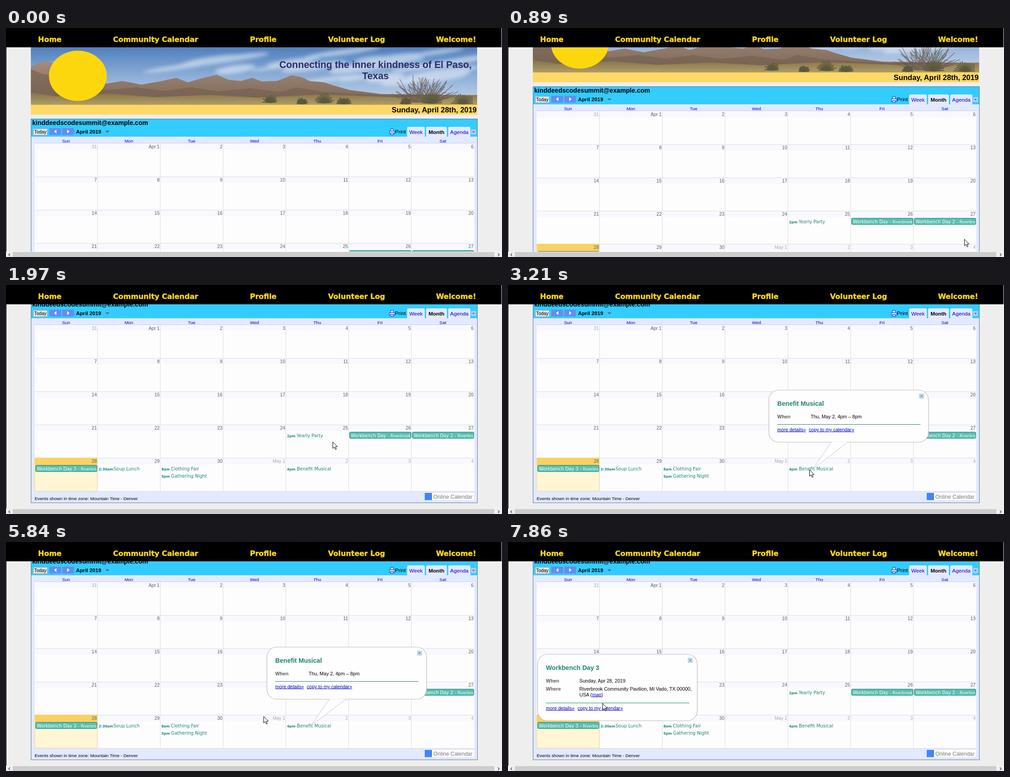
These frames come from a looping animation (1098 px wide and 510 px high, 8000 ms). An HTML page:

```html
<!DOCTYPE html>
<html lang="en">
<head>
<meta charset="utf-8">
<title>Community Calendar</title>
<style>
html, body { margin: 0; width: 100%; height: 100%; overflow: hidden; background: #eee; }
svg { display: block; }
text { white-space: pre; }
.s { font-family: "Liberation Sans", Arial, sans-serif; }
.v { font-family: "DejaVu Sans", Verdana, sans-serif; }
.o { font-family: "Open Sans", "Noto Sans", sans-serif; }
.b { font-weight: bold; }
.m { text-anchor: middle; }
.e { text-anchor: end; }
.u { text-decoration: underline; }
</style>
</head>
<body>
<svg id="stage" width="1098" height="510" viewBox="0 0 1098 510"></svg>
<script>
const LOOP = 8000, TEAL = '#1f8273', LINK = '#0000cc';
const text = (x, y, str, size, fill, cls = 's') =>
  `<text x="${x}" y="${y}" font-size="${size}" fill="${fill}" class="${cls}">${str}</text>`;
const rect = (x, y, w, h, fill, more = '') =>
  `<rect x="${x}" y="${y}" width="${w}" height="${h}" fill="${fill}" ${more}/>`;
const path = (d, fill, more = '') => `<path d="${d}" fill="${fill}" ${more}/>`;

let seed = 7;
const rnd = () => (seed = (seed * 16807) % 2147483647) / 2147483647;

// ---- banner ----
function tuft(x, y, r, color) {
  let d = '';
  for (let a = -1.5; a <= 1.5; a += 0.2) {
    const l = r * (0.75 + rnd() * 0.35);
    d += `M${x} ${y}L${(x + Math.sin(a) * l).toFixed(1)} ${(y - Math.cos(a) * l).toFixed(1)}`;
  }
  return path(d, 'none', `stroke="${color}" stroke-width="2"`);
}

function shrub() {
  let d = '';
  for (let i = 0; i < 110; i++) {
    const a = (rnd() - 0.5) * 2.6, l = 30 + rnd() * 32, x = 925 + (rnd() - 0.5) * 50;
    d += `M${x.toFixed(1)} 166L${(x + Math.sin(a) * l).toFixed(1)} ${(166 - Math.cos(a) * l).toFixed(1)}`;
  }
  return path(d, 'none', 'stroke="#65564c" stroke-width="1.3" opacity=".75"');
}

function banner() {
  let clouds = '';
  for (let i = 0; i < 26; i++) {
    const x = 55 + rnd() * 988, y = 50 + rnd() * 70;
    clouds += `<ellipse cx="${x.toFixed(0)}" cy="${y.toFixed(0)}" rx="${(35 + rnd() * 75).toFixed(0)}" ry="${(3 + rnd() * 7).toFixed(0)}" transform="rotate(-8 ${x.toFixed(0)} ${y.toFixed(0)})"/>`;
  }
  const ridge = 'M55 86L72 78 95 74 130 92 175 112 222 124 258 118 300 126 345 118 377 111 402 121 430 113 466 104 492 115 520 118 545 111 566 119 600 118 633 105 656 110 672 118 705 121 722 127 760 138 830 147 1043 150V171H55Z';
  const shade = 'M55 92L85 104 120 100 160 128 225 138 290 132 350 140 410 132 470 141 540 134 610 143 640 132 700 142 780 147 900 152V171H55Z';
  const ground = 'M55 144L110 152 230 146 330 154 450 149 560 155 700 148 860 154 1043 149V171H55Z';
  const tufts = [[585, 166, 17], [705, 167, 21], [748, 169, 16], [942, 168, 25], [1012, 169, 25], [885, 169, 15], [655, 169, 13]];
  return `<svg x="55" y="43" width="988" height="128" viewBox="55 43 988 128">` +
    rect(55, 43, 988, 128, 'url(#sky)') +
    `<g fill="#edf2f8" opacity=".58" filter="url(#soft)">${clouds}</g>` +
    path(ridge, 'url(#rock)') + path(shade, '#735f50', 'opacity=".6"') + path(ground, 'url(#sand)') +
    shrub() + tufts.map(([x, y, r]) => tuft(x, y, r, '#5b593b')).join('') + '</svg>' +
    '<ellipse cx="159" cy="106.5" rx="64" ry="56" fill="#fdd70d"/>' +
    text(818, 89, 'Connecting the inner kindness of El Paso,', 21.3, '#2c2c66', 's b m') +
    text(818, 114, 'Texas', 21.3, '#2c2c66', 's b m') +
    rect(55, 171, 988, 22, '#ffd966') +
    text(1042, 188, 'Sunday, April 28th, 2019', 16.45, '#000', 's b e');
}

// ---- calendar ----
const colX = c => c ? 63.5 + 139 * c : 63.5;
const rowY = r => 257 + 74 * r;

function timed(c, r, line, time, name, gap) {
  const x = colX(c) + 2.5, y = rowY(r) + 28 + 15.5 * line;
  return text(x, y, time, 7.7, TEAL, 'v b') + text(x + gap, y, name, 9.95, TEAL, 'v');
}

function allDay(c, r, name) {
  const x = colX(c) + 1.5, y = rowY(r) + 16;
  return rect(x + .5, y + .5, 136, 14, '#58bfb1', `stroke="${TEAL}" rx="2"`) +
    `<svg x="${x}" y="${y}" width="136" height="15"><text x="3.5" y="12" font-size="9.9" fill="#fff" class="v">${name} - <tspan font-size="8.2">Riverbrook Community</tspan></text></svg>`;
}

function calendar() {
  let s = rect(55.5, 202.5, 988, 450.5, '#e3e9ff', 'stroke="#56788c"') +
    rect(56, 203, 987, 39, '#33ccff') +
    text(58, 216, 'kinddeedscodesummit@example.com', 14.13, '#000', 's b') +
    rect(60.5, 224.5, 31, 14, '#e4e4e4', 'stroke="#a9a9a9"') + text(76, 235, 'Today', 10.3, '#000', 's m') +
    rect(96, 223, 26, 15, '#668cee') + rect(124.5, 223, 26, 15, '#668cee') +
    path('M111.5 226v9l-5-4.5zM135.5 226v9l5-4.5z', '#fff') +
    text(155, 235, 'April 2019', 11.7, '#000', 's b') + path('M220 229h9l-4.5 4.5z', '#666') +
    path('M851.5 229v-4.5h6v4.5M851 235.5h-2v-6h11v6h-2M851.5 233.5h6v4h-6z', '#e8f4ff', 'stroke="#2b5fc4" stroke-width="1.3"') +
    text(861, 234.5, 'Print', 11.7, '#000');
  for (const [x, w, label, bold] of [[888, 39, 'Week'], [930, 46, 'Month', 1], [979, 49, 'Agenda']])
    s += path(`M${x} 242v-19q0-3 3-3h${w - 6}q3 0 3 3v19z`, '#e3e9ff') +
      text(x + w / 2, 236, label, 11.7, bold ? '#000' : LINK, bold ? 's b m' : 's m');
  s += rect(1029.5, 226, 11, 11, '#b5ccf5') + path('M1032 230h6l-3 3.5z', '#4a6fb5');

  s += rect(63.5, 257, 973, 370, '#fdfdfe');
  ['Sun', 'Mon', 'Tue', 'Wed', 'Thu', 'Fri', 'Sat'].forEach((d, c) => {
    s += text(colX(c) + 69.5, 254.5, d, 9.9, LINK, 's m');
  });
  for (let r = 0; r < 5; r++) s += rect(63.5, rowY(r), 973, 14, '#f7f9ff');
  s += rect(64, 553, 138, 74, '#fff6d5', 'stroke="#f8d779"') + rect(63.5, 553, 139, 16, '#fad163');
  let grid = '';
  for (let c = 1; c < 7; c++) grid += `M${colX(c)} 257V627`;
  for (let r = 1; r < 6; r++) grid += `M63.5 ${rowY(r) + .5}H1036.5`;
  s += path(grid, 'none', 'stroke="#dcdcdc"') + path('M63.5 256.5H1036.5', 'none', 'stroke="#c3d3ee"') +
    rect(63.5, 553, 139, 1, '#fad163');
  for (let i = 0; i < 35; i++) {
    const day = i === 0 ? 31 : i <= 30 ? i : i - 30;
    const label = (i === 1 ? 'Apr ' : i === 31 ? 'May ' : '') + day;
    s += text(colX(i % 7) + 137.5, rowY(i / 7 | 0) + 11, label, 10.1, i === 0 || i > 30 ? '#aaa' : '#5c5c5c', 's e');
  }
  s += timed(4, 3, 0, '2pm', 'Yearly Party', 21.5) +
    allDay(5, 3, 'Workbench Day') + allDay(6, 3, 'Workbench Day 2') + allDay(0, 4, 'Workbench Day 3') +
    timed(1, 4, 0, '2:30am', 'Soup Lunch', 33) +
    timed(2, 4, 0, '8am', 'Clothing Fair', 21) + timed(2, 4, 1, '5pm', 'Gathering Night', 21.5) +
    timed(4, 4, 0, '4pm', 'Benefit Musical', 22) +
    text(63.5, 647, 'Events shown in time zone: Mountain Time - Denver', 9.9, '#000') +
    rect(927, 631, 109, 16, '#fff') + rect(927, 631, 16, 16, '#4285f4') +
    text(946, 643.5, 'Online Calendar', 12, '#777');
  return s;
}

// ---- popups ----
function bubble(x, y, h, title, rows, tail) {
  const end = y + h;
  let s = rect(x, y, 353.5, h, '#fefefe', 'rx="22" stroke="#bbb" stroke-width="1.2"');
  if (tail) s += path(tail, '#fefefe', 'stroke="#c4c4c4"');
  s += text(x + 18.5, y + 35, title, 14.1, TEAL, 's b');
  rows.forEach(([key, value], i) => {
    s += text(x + 18.5, y + 63 + 18 * i, key, 10.8, '#5a5a5a', 's b') + text(x + 92.5, y + 63 + 18 * i, value, 10.7, '#000');
  });
  return s + rect(x + 18.5, end - 40, 317, 1, TEAL) +
    text(x + 18.5, end - 24.5, 'more details»', 10.55, LINK, 's u') +
    text(x + 88.5, end - 24.5, 'copy to my calendar»', 10.55, LINK, 's u') +
    rect(x + 333.5, y + 9, 9, 9, '#e4f1fb', 'stroke="#84b0d6"') +
    path(`M${x + 335.5} ${y + 11}l5 5m0-5l-5 5`, 'none', 'stroke="#4d88b8" stroke-width="1.3"');
}

// ---- fixed browser parts ----
function chrome() {
  let s = rect(0, 43, 1, 455, '#000') + rect(0, 0, 1097, 43, '#000');
  for (const [x, label] of [[71, 'Home'], [237, 'Community Calendar'], [540, 'Profile'], [713, 'Volunteer Log'], [952, 'Welcome!']])
    s += `<text x="${x}" y="31" font-size="16" fill="#fdd70d" stroke="#fdd70d" stroke-width=".5" class="v b">${label}</text>`;
  return s + rect(0, 498, 1098, 12, '#f0f0f0') + '<rect id="thumb" x="15" y="499" width="1066" height="11"/>' +
    path('M9 502l-3 3 3 3M1089 502l3 3-3 3', 'none', 'stroke="#505050" stroke-width="1.5"');
}

const ARROW = 'M0 0V14.5L3.4 11.4 5.8 17 8 16 5.6 10.6H10.2Z';
const HAND = 'M-1.6 1Q0-1 1.6 1V7Q3.3 5.8 4.4 7.4 6 6.6 6.8 8.3 8 8 8.3 9.6V13.5Q8.2 15.5 7 17V19H-1V17.4L-5 11.6Q-5.6 9.3-3.6 9.8L-1.6 11.8Z';

const stage = document.getElementById('stage');
stage.innerHTML = `<defs>
<linearGradient id="sky" x2="0" y2="1"><stop offset="0" stop-color="#5080bd"/><stop offset=".45" stop-color="#86a9d5"/><stop offset="1" stop-color="#c9d8ea"/></linearGradient>
<linearGradient id="rock" x2="0" y2="1"><stop offset="0" stop-color="#a58b7b"/><stop offset="1" stop-color="#7b6654"/></linearGradient>
<linearGradient id="sand" x2="0" y2="1"><stop offset="0" stop-color="#84734d"/><stop offset="1" stop-color="#b29d63"/></linearGradient>
<filter id="soft"><feGaussianBlur stdDeviation="4"/></filter></defs>` +
  rect(0, 0, 1098, 510, '#eee') +
  `<g id="page">${banner()}${calendar()}</g>` +
  `<g id="pop1">${bubble(577.5, 234, 116, 'Benefit Musical', [['When', 'Thu, May 2, 4pm – 8pm']], 'M716 349.5L675.5 409 753 349.5')}</g>` +
  `<g id="pop2">${bubble(65.5, 250, 148, 'Workbench Day 3', [['When', 'Sunday, Apr 28, 2019'], ['Where', 'Riverbrook Community Pavilion, Mi Vado, TX 00000,']])}` +
  `<text x="158" y="343.5" font-size="10.7" class="s">USA (<tspan fill="${LINK}" class="u">map</tspan>)</text></g>` +
  chrome() +
  `<g id="status"><rect id="panel" x="-1" y="498.5" height="13" fill="#f2f2f2" stroke="#c0c0c0"/>${text(4, 507, '', 9.35, '#333', 'o')}</g>` +
  '<path id="cursor" fill="#fff" stroke="#000" stroke-linejoin="round"/>';

const el = id => document.getElementById(id);
const show = (id, on) => el(id).setAttribute('visibility', on ? 'visible' : 'hidden');

let eid = '';
for (let i = 0; i < 68; i++) eid += 'abcdefghijkmnopqrsuvxyzABDEGHKNRSTVXYZ0123456789'[rnd() * 48 | 0];
const COPY_URL = 'https://calendar.google.com/calendar/event?action=TEMPLATE&hl=en&text=Benefit Musical&dates=20190502T160000/20190502T200000&location&ctz=America/Denver&details';
const MORE_URL = `https://www.google.com/calendar/event?eid=${eid}&ctz=America/Denver`;

// ---- motion ----
const SCROLL = [0, 20, 72, 128, 163, 168];
// start, end, steps, from, bend, to, hand at step test
const MOVES = [
  [500, 650, 3, [1018, 501], [1014, 485], [1010, 470], () => false],
  [1430, 2200, 11, [1003, 462], [800, 256], [660, 391], () => false],
  [2280, 2510, 4, [660, 396], [660, 425], [664, 406], k => k > 1],
  [2740, 2740, 1, [668, 406], [668, 406], [668, 406], () => true],
  [3210, 3600, 6, [667, 411], [692, 375], [682, 323], k => k > 5],
  [4920, 5150, 4, [681, 321], [667, 321], [650, 322], () => true],
  [5450, 5990, 8, [648, 326], [620, 372], [540, 400], () => false],
  [6160, 6770, 9, [520, 406], [330, 470], [130, 408], k => k > 7],
  [7310, 7700, 6, [138, 404], [185, 385], [209, 359], k => k < 2]
];

function stepAt(t, a, b, n) {
  if (t < a) return 0;
  return t >= b ? n : 1 + Math.floor((t - a) / (b - a) * (n - 1) + 0.2);
}

function pointer(t) {
  const move = MOVES.filter(m => t >= m[0]).pop();
  if (!move) return null;
  const [a, b, n, from, bend, to, isHand] = move;
  const k = stepAt(t, a, b, n), q = n > 1 ? (k - 1) / (n - 1) : 1;
  const p = n > 6 ? q * q * (3 - 2 * q) : q;
  const at = i => (1 - p) * (1 - p) * from[i] + 2 * p * (1 - p) * bend[i] + p * p * to[i];
  return { x: Math.round(at(0)), y: Math.round(at(1)), hand: isHand(k) };
}

let shownUrl = '';
function setStatus(t) {
  const on = t >= 3750 && t < 5600;
  show('status', on);
  if (!on) return;
  el('status').setAttribute('opacity', t < 3830 || t >= 5525 ? 0.5 : 1);
  const url = t < 5075 ? COPY_URL : MORE_URL;
  if (url === shownUrl) return;
  shownUrl = url;
  const label = el('status').querySelector('text');
  label.textContent = url;
  el('panel').setAttribute('width', Math.round(label.getComputedTextLength()) + 9);
}

function draw(t) {
  el('page').setAttribute('transform', `translate(0 ${-SCROLL[stepAt(t, 820, 1130, 5)]})`);
  el('thumb').setAttribute('fill', t >= 500 && t < 575 ? '#a6a6a6' : '#cdcdcd');
  show('pop1', t >= 2910 && t < 6930);
  show('pop2', t >= 6930);
  setStatus(t);
  const c = pointer(t);
  show('cursor', c);
  if (c) {
    el('cursor').setAttribute('d', c.hand ? HAND : ARROW);
    el('cursor').setAttribute('transform', `translate(${c.x + .5} ${c.y + .5})`);
  }
}

let origin = null;
function frame(now) {
  if (origin === null) origin = now;
  draw((now - origin) % LOOP);
  requestAnimationFrame(frame);
}
draw(0);
requestAnimationFrame(frame);
</script>
</body>
</html>
```
